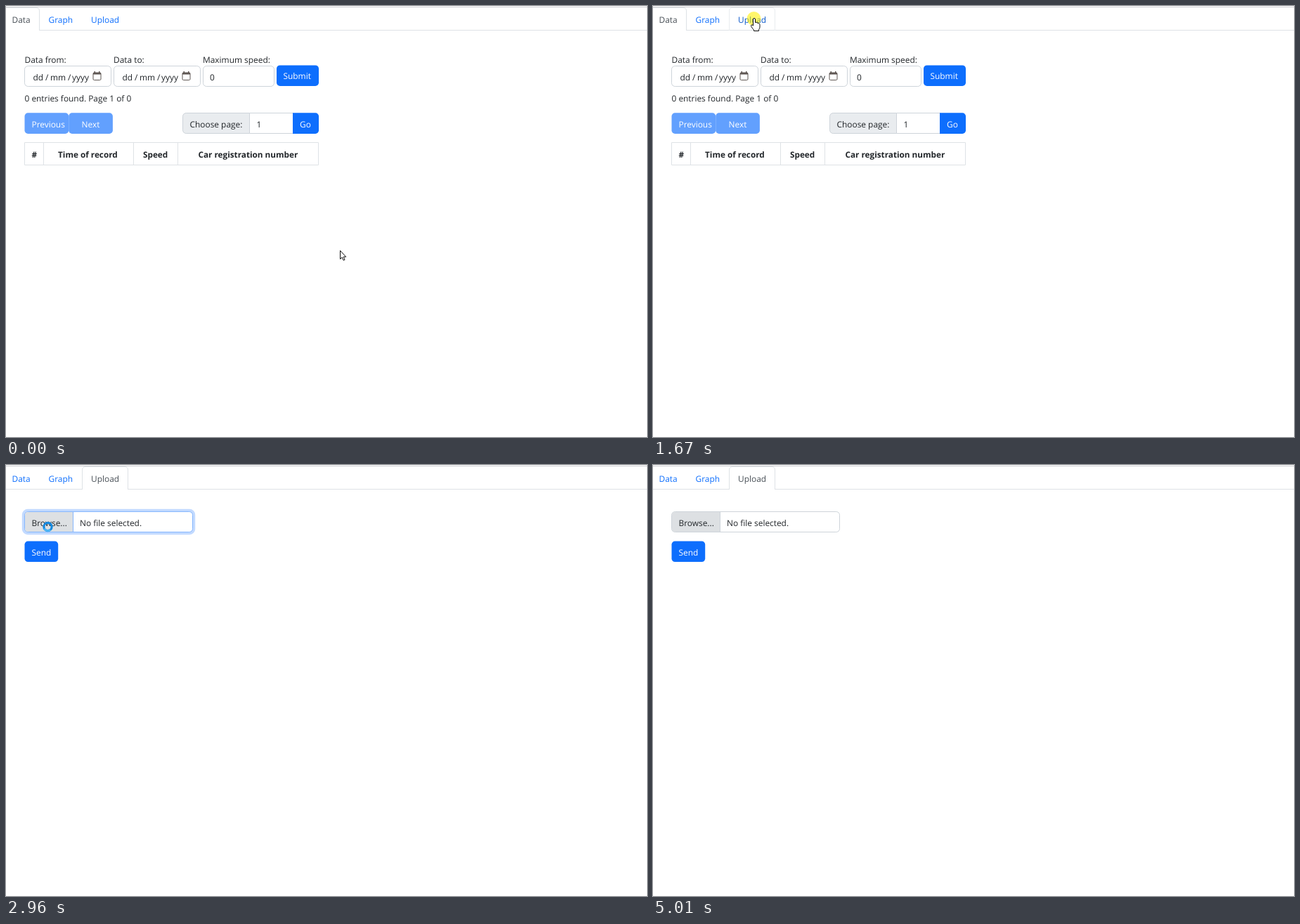
Recreate the animation shown at these times as an HTML page with a canvas. Size 912 px wide and 614 px high, loop 8 s.

```html
<!DOCTYPE html>
<html lang="en">
<head>
<meta charset="utf-8">
<title>Speed records</title>
<style>
html, body { margin: 0; width: 100%; height: 100%; overflow: hidden; background: #fff; }
canvas { display: block; }
</style>
</head>
<body>
<canvas id="stage" width="912" height="614"></canvas>
<script>
const LOOP = 8000;
const ctx = document.getElementById('stage').getContext('2d');
const FONT = '"Open Sans", "Noto Sans", sans-serif';
const BLUE = '#0d6efd', INK = '#212529', EDGE = '#ced4da', LINE = '#dee2e6', SOFT = '#e9ecef';

const clamp = v => Math.max(0, Math.min(1, v));
const fade = (t, from, to) => clamp((t - from) / (to - from));

function mix(a, b, p) {
  const part = i => {
    const u = parseInt(a.substr(i, 2), 16), v = parseInt(b.substr(i, 2), 16);
    return Math.round(u + (v - u) * p);
  };
  return `rgb(${part(1)},${part(3)},${part(5)})`;
}

function text(str, x, y, color = INK, weight = 400) {
  ctx.font = `${weight} ${weight > 400 ? 11.75 : 11.9}px ${FONT}`;
  ctx.fillStyle = color;
  ctx.fillText(str, x, y);
}

function box(x, y, w, h, fill, stroke, radius = 4.8) {
  ctx.beginPath();
  ctx.roundRect(x, y, w, h, radius);
  if (fill) { ctx.fillStyle = fill; ctx.fill(); }
  if (stroke) { ctx.strokeStyle = stroke; ctx.lineWidth = 1; ctx.stroke(); }
}

function rect(x, y, w, h, color) {
  ctx.fillStyle = color;
  ctx.fillRect(x, y, w, h);
}

function tab(left, right, color, active) {
  ctx.beginPath();
  ctx.moveTo(left, 35);
  ctx.lineTo(left, 7);
  ctx.quadraticCurveTo(left, 2.5, left + 4.5, 2.5);
  ctx.lineTo(right - 4.5, 2.5);
  ctx.quadraticCurveTo(right, 2.5, right, 7);
  ctx.lineTo(right, 35);
  if (active) { ctx.fillStyle = '#fff'; ctx.fill(); }
  ctx.strokeStyle = color;
  ctx.lineWidth = 1;
  ctx.stroke();
}

function dateField(x) {
  box(x + .5, 85.5, 123, 29, '#fff', EDGE);
  [['dd', 12.5], ['/', 30], ['mm', 37], ['/', 62], ['yyyy', 68]]
    .forEach(([s, dx]) => text(s, x + dx, 105.5));
  const dark = '#5f5753';
  box(x + 98, 95, 11, 10.5, null, dark, 1.5);
  rect(x + 98, 95, 11, 2.5, dark);
  rect(x + 99.5, 93, 1.5, 2, dark);
  rect(x + 106, 93, 1.5, 2, dark);
}

function dataPage() {
  text('Data from:', 26.5, 81);
  text('Data to:', 153, 81);
  text('Maximum speed:', 280, 81);
  dateField(26);
  dateField(153);
  box(280.5, 85.5, 101, 29, '#fff', EDGE);
  text('0', 290, 105.5);
  box(385, 84.4, 60, 29.6, BLUE);
  text('Submit', 394.5, 104, '#fff');
  text('0 entries found. Page 1 of 0', 26.5, 136);

  box(26.5, 152.3, 62.7, 29.7, '#62a0fe');
  box(89.2, 152.3, 62.7, 29.7, '#62a0fe');
  text('Previous', 36.5, 172.5, '#fff');
  text('Next', 107.5, 172.5, '#fff');

  box(251.5, 152.5, 95, 29, SOFT, EDGE, [4.8, 0, 0, 4.8]);
  box(346.5, 152.5, 62, 29, '#fff', EDGE, 0);
  box(408, 152.3, 37, 29.7, BLUE, null, [0, 4.8, 4.8, 0]);
  text('Choose page:', 261.5, 172.5);
  text('1', 356.5, 172.5);
  text('Go', 418, 172.5, '#fff');

  box(26.5, 194.5, 418, 32, null, LINE, 0);
  [53, 181, 244].forEach(x => rect(x, 195, 1, 31, LINE));
  [['#', 36.5], ['Time of record', 74], ['Speed', 195], ['Car registration number', 273.5]]
    .forEach(([s, x]) => text(s, x, 216.3, INK, 700));
}

function uploadPage(t) {
  const hover = fade(t, 2440, 2590);
  const focus = fade(t, 2840, 2960) * (1 - fade(t, 3060, 3210));
  if (focus) {
    const grow = 3.2 * focus;
    box(26 - grow, 66 - grow, 240 + 2 * grow, 30 + 2 * grow,
        `rgba(13,110,253,${.25 * focus})`, null, 4.8 + grow);
  }
  const edge = mix(EDGE, '#86b7fe', focus);
  box(26.5, 66.5, 239, 29, '#fff', edge);
  box(27, 67, 68, 28, mix(SOFT, '#dde0e3', hover), null, [4, 0, 0, 4]);
  rect(95, 67, 1, 28, edge);
  text('Browse...', 36.5, 86.7);
  text('No file selected.', 105, 86.7);
  box(26.5, 108.5, 47.7, 29.6, BLUE);
  text('Send', 36.5, 129, '#fff');
}

function nav(t, upload) {
  rect(0, 1, 912, 1, '#cfcfd2');
  rect(0, 34, 912, 1, LINE);
  const swap = fade(t, 1820, 1900);
  const over = fade(t, 1260, 1410);
  if (upload) tab(108.5, 173.5, LINE, true);
  else {
    tab(-4, 47.5, LINE, true);
    if (t >= 1260) tab(108.5, 173.5, SOFT);
  }
  text('Data', 8.5, 24.3, mix('#495057', BLUE, swap));
  text('Graph', 60.5, 24.3, BLUE);
  text('Upload', 121, 24.3, upload ? mix('#0a58ca', '#495057', swap) : mix(BLUE, '#0a58ca', over));
}

// Each move: start, step length, then one point per listed step.
const moves = [
  [580, 70, 471, 343, 452, 322, 417, 282, 376, 235, 327, 184, 279, 137,
    234, 98, 196, 66, 169, 42, 153, 27, 146, 20, 144, 17],
  [2150, 73, 141, 20, 129, 33, 107, 54, 83, 76, 66, 90, 61, 92, 59, 88],
  [4420, 65.5, 60, 89, 78, 84, 132, 82, 226, 88, 352, 103, 498, 126, 640, 152, 770, 176, 870, 192]
];

function pointer(t) {
  let at = [475, 348];
  for (const [start, step, ...pts] of moves) {
    if (t < start) break;
    const i = Math.min(Math.floor((t - start) / step), pts.length / 2 - 1);
    at = [pts[2 * i], pts[2 * i + 1]];
  }
  return at;
}

function outline(d) {
  const path = new Path2D(d);
  ctx.fillStyle = '#fff';
  ctx.fill(path);
  ctx.strokeStyle = '#111';
  ctx.lineWidth = 1;
  ctx.lineJoin = 'round';
  ctx.stroke(path);
}

const ARROW = 'M.5 .5V12.5L3.2 10L5.1 14.3L7 13.5L5.2 9.3H8.7Z';
const HAND = 'M-1.5 11V2Q-1.5 .5 0 .5Q1.5 .5 1.5 2V6.5Q4 5.4 4.2 7.2Q6.4 6.4 6.6 8.2' +
  'Q8 7.8 8 9.5V13Q8 15 6.5 16.5V18.5H-.5V17Q-2 16 -4.5 11.7Q-4.6 9.3 -2.8 10Z';

function spinner(x, y, t) {
  const turn = t / 150;
  ctx.lineWidth = 3.2;
  ctx.strokeStyle = '#1489df';
  ctx.beginPath();
  ctx.arc(x, y, 5.6, 0, 2 * Math.PI);
  ctx.stroke();
  ctx.strokeStyle = '#4bb4f5';
  ctx.beginPath();
  ctx.arc(x, y, 5.6, turn, turn + 1.8);
  ctx.stroke();
}

function cursor(t) {
  if (t >= 5010) return;
  const [x, y] = pointer(t);
  const clicking = (t >= 1670 && t < 1820) || (t >= 2740 && t < 2880);
  if (clicking) {
    ctx.fillStyle = 'rgba(255,240,0,.58)';
    ctx.beginPath();
    ctx.arc(x - .5, y + 1, 10, 0, 2 * Math.PI);
    ctx.fill();
  }
  if (t >= 2960 && t < 3160) return spinner(59.5, 88, t);
  ctx.save();
  ctx.translate(x, y);
  outline(t >= 1260 && t < 2223 ? HAND : ARROW);
  ctx.restore();
}

function draw(t) {
  const upload = t >= 1820;
  rect(0, 0, 912, 614, '#fff');
  ctx.textRendering = 'geometricPrecision';
  nav(t, upload);
  if (upload) uploadPage(t);
  else dataPage();
  cursor(t);
}

const begin = performance.now();
function tick() {
  draw((performance.now() - begin) % LOOP);
  requestAnimationFrame(tick);
}
tick();
</script>
</body>
</html>
```
